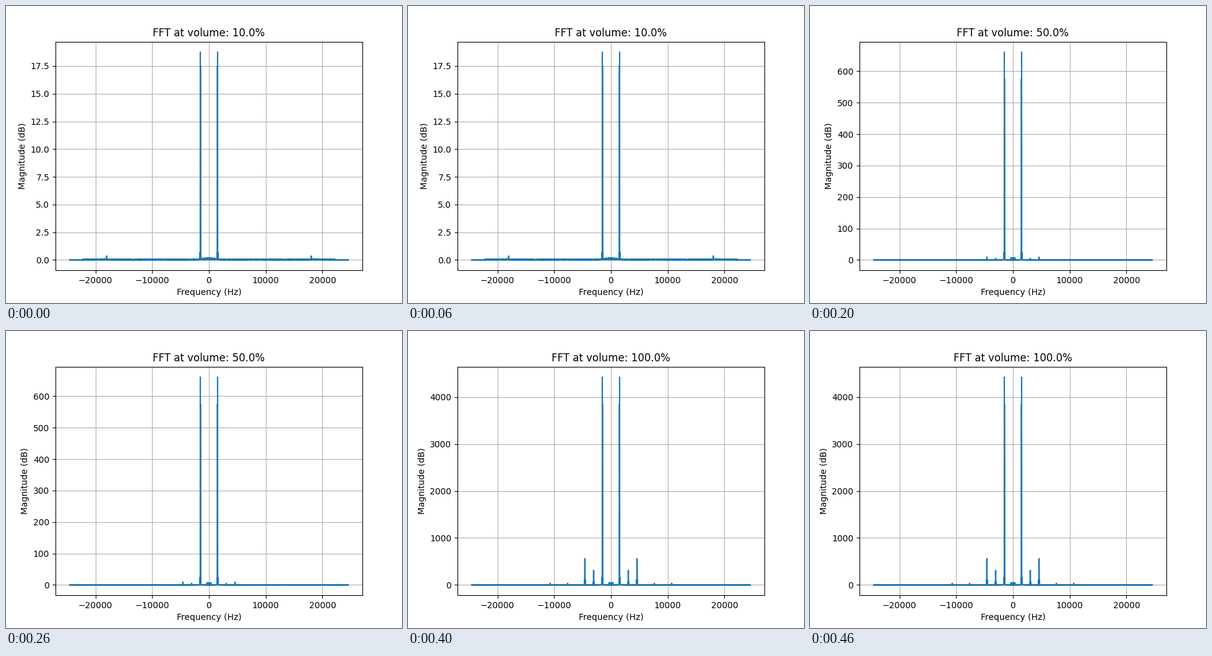
Write a matplotlib script that moves like this. It is 640 px wide and 480 px high and loops after 500 ms.

```python
import numpy as np
import matplotlib.pyplot as plt
from matplotlib.animation import FuncAnimation

VOLUMES = [0.1, 0.3, 0.5, 0.7, 1.0]
PEAKS = [18.76, 148.67, 661.2, 1452, 4425.5]
TONE = 1528
F_MAX = 24576
BINS = 3000
freq = np.linspace(0, F_MAX, BINS)


def spike(mag, hz, height):
    i = int(round(hz / F_MAX * (BINS - 1)))
    mag[i] = max(mag[i], height)


def noise_floor(rng):
    sigma = 0.022 + 0.045 * np.exp(-(freq / 1500) ** 2)
    sigma += 0.009 * np.exp(-((freq - 19000) / 1800) ** 2)
    mag = rng.rayleigh(sigma)
    mag[freq > 22280] *= 0.1
    spike(mag, 18020, 0.36)
    return mag


def spectrum(volume, peak):
    mag = noise_floor(np.random.default_rng(3))

    # low hum and the skirt around the tone
    for hz in range(30, 420, 65):
        spike(mag, hz, 0.0105 * peak)
    mag = np.maximum(mag, 0.004 * peak * np.exp(-np.abs(freq - TONE) / 160))
    for off in (-60, 60):
        spike(mag, TONE + off, 0.035 * peak)

    # the tone falls between two bins
    spike(mag, TONE - 28, 0.87 * peak + 1.2)
    spike(mag, TONE - 4, peak)

    # distortion grows with the sixth power of the volume
    gain = volume ** 6
    for n, height in ((2, 308), (3, 555), (5, 33), (7, 33)):
        for off in (-12, 12):
            spike(mag, n * TONE + off, gain * height)
        for off in (-60, 60):
            spike(mag, n * TONE + off, 0.2 * gain * height)
    return mag


# positive half first, then the mirrored negative half
x = np.concatenate([freq, -freq[::-1]])

fig, ax = plt.subplots(figsize=(6.4, 4.8), dpi=100)


def draw(k):
    ax.clear()
    mag = spectrum(VOLUMES[k], PEAKS[k])
    ax.plot(x, np.concatenate([mag, mag[::-1]]))
    ax.set_title(f"FFT at volume: {VOLUMES[k]:.1%}")
    ax.set_xlabel("Frequency (Hz)")
    ax.set_ylabel("Magnitude (dB)")
    ax.grid(True)


anim = FuncAnimation(fig, draw, frames=len(VOLUMES), interval=100,
                     repeat=True, repeat_delay=0)
plt.show()
```
